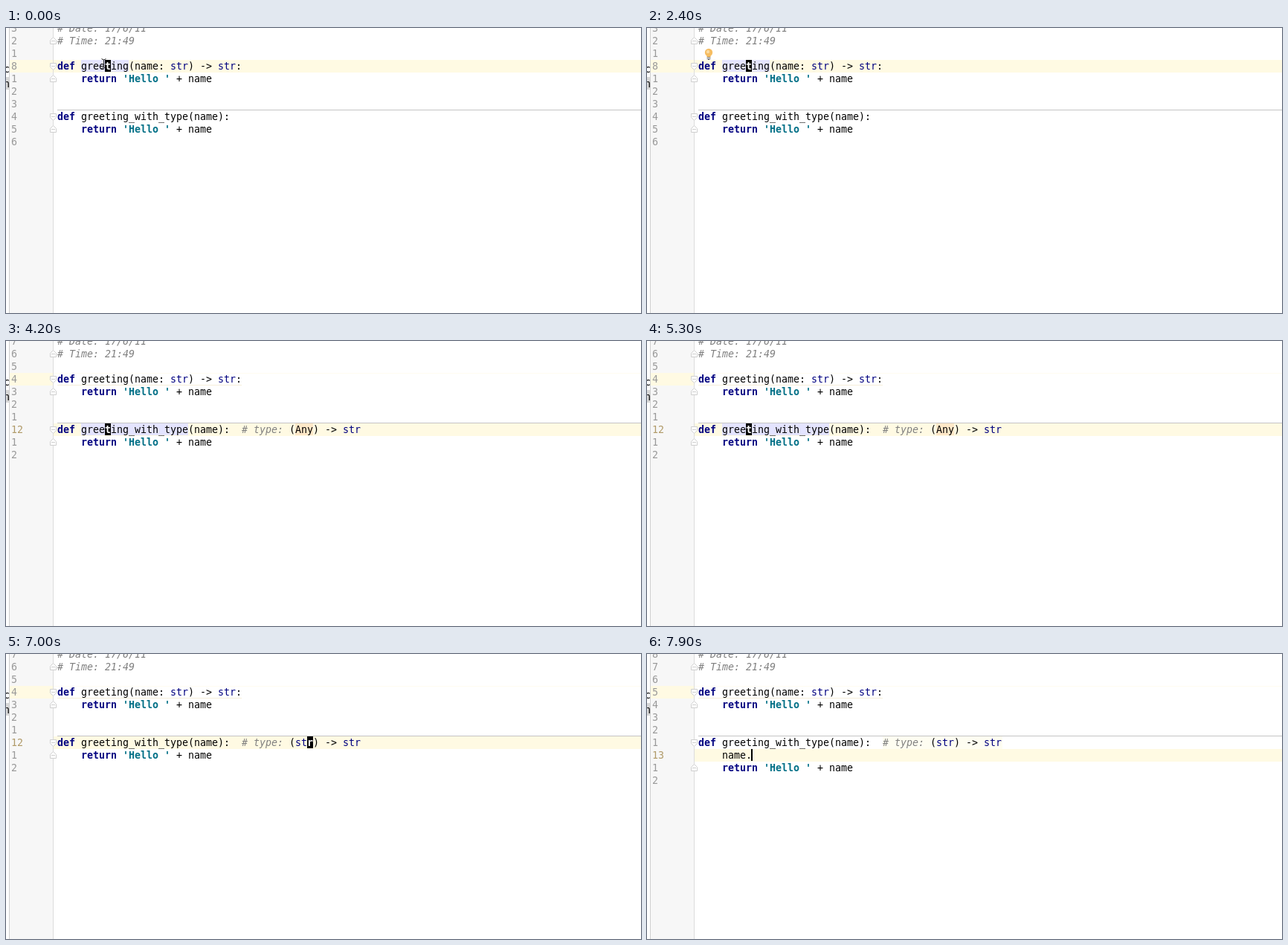
Recreate the animation shown at these times as an HTML page with a canvas. Size 854 px wide and 384 px high, loop 8000 ms.

```html
<!DOCTYPE html>
<html lang="en">
<head>
<meta charset="utf-8">
<title>Editor: type comment</title>
<style>
  html, body { margin: 0; width: 100%; height: 100%; overflow: hidden; background: #fff; }
  canvas { display: block; }
</style>
</head>
<body>
<canvas id="stage" width="854" height="384"></canvas>
<script>
const ctx = document.getElementById('stage').getContext('2d');
const W = 854, H = 384, LOOP = 8000;
const LEFT = 69, CHAR = 8, ROW = 17;
const FAMILY = '"DejaVu Sans Mono", monospace';
const SIZE = '13.29px ';

const STYLES = {
  plain: ['', '#000'],
  keyword: ['bold ', '#000080'],
  string: ['bold ', '#006f86'],
  builtin: ['', '#000080'],
  comment: ['italic ', '#808080'],
  number: ['', '#999'],
  current: ['', '#b09a68'],
  caret: ['bold ', '#fff']
};

// time, row, column, shape
const CARET = [
  [0, 3, 8, 'block'], [600, 3, 8, 'off'], [900, 3, 8, 'block'],
  [1200, 3, 8, 'off'], [1500, 3, 8, 'block'], [1700, 3, 8, 'off'],
  [2200, 3, 8, 'block'], [2500, 4, 8, 'block'], [2600, 5, 0, 'block'],
  [2700, 6, 0, 'block'], [2800, 7, 8, 'block'], [3700, 7, 8, 'off'],
  [4200, 7, 8, 'block'], [4500, 7, 8, 'off'], [4700, 7, 8, 'block'],
  [5000, 7, 8, 'off'], [5200, 7, 8, 'block'], [5400, 7, 40, 'block'],
  [5700, 7, 40, 'off'], [6000, 7, 40, 'block'], [6200, 7, 40, 'off'],
  [6500, 7, 40, 'bar'], [6600, 7, 41, 'bar'], [6700, 7, 42, 'bar'],
  [6800, 7, 43, 'bar'], [7000, 7, 42, 'block'], [7200, 7, 42, 'off'],
  [7500, 8, 4, 'bar']
];

const colX = col => LEFT + col * CHAR;
const rowTop = row => row * ROW - 8;
const between = (t, from, to) => t >= from && t < to;

function rect(x, y, w, h, color) {
  ctx.fillStyle = color;
  ctx.fillRect(x, y, w, h);
}

function text(str, x, row, style) {
  const [weight, color] = STYLES[style];
  ctx.font = weight + SIZE + FAMILY;
  ctx.fillStyle = color;
  ctx.fillText(str, x, row * ROW + 5);
}

function codeLines(t, body) {
  const ret = [['    ', 'plain'], ['return', 'keyword'], [' ', 'plain'],
    ["'Hello '", 'string'], [' + name', 'plain']];
  const typed = [['def', 'keyword'], [' greeting_with_type(name):', 'plain']];
  if (t >= 3200) {
    const arg = t < 6500 ? 'Any' : 'str'.slice(0, Math.floor((t - 6500) / 100));
    typed.push(['  ', 'plain'], ['# type: ', 'comment'], ['(', 'plain'],
      [arg, t < 6500 ? 'plain' : 'builtin'], [') -> ', 'plain'], ['str', 'builtin']);
  }
  const lines = [
    [['# Date: 17/6/11', 'comment']],
    [['# Time: 21:49', 'comment']],
    [],
    [['def', 'keyword'], [' greeting(name: ', 'plain'], ['str', 'builtin'],
      [') -> ', 'plain'], ['str', 'builtin'], [':', 'plain']],
    ret, [], [], typed
  ];
  if (body !== null) lines.push([['    ' + body, 'plain']]);
  lines.push(ret, []);
  return lines;
}

function drawGutter(current, count) {
  rect(0, 0, 64, H, '#f7f7f7');
  rect(0, 0, 4, H, '#fff');
  rect(0, 66, 4, 17, '#d8d8d8');
  ctx.save();
  ctx.beginPath();
  ctx.rect(0, 0, 4, H);
  ctx.clip();
  text('c', -3, 3.25, 'plain');
  text('n', -3, 4.4, 'plain');
  ctx.restore();
  rect(5, rowTop(3), 59, ROW, '#fffae3');
  rect(4, 0, 1, H, '#d0d0d0');
  rect(63, 0, 1, H, '#dcdcdc');
  for (let r = 0; r < count; r++) {
    const label = r === current ? r + 5 : Math.abs(r - current);
    text(label, 7, r, r === current && r !== 3 ? 'current' : 'number');
  }
}

function drawFold(row, dir) {
  const y = row * ROW + 0.5;
  ctx.beginPath();
  ctx.moveTo(59.5, y - 4 * dir);
  ctx.lineTo(67.5, y - 4 * dir);
  ctx.lineTo(67.5, y + dir);
  ctx.lineTo(63.5, y + 5 * dir);
  ctx.lineTo(59.5, y + dir);
  ctx.closePath();
  ctx.fillStyle = '#fff';
  ctx.fill();
  ctx.strokeStyle = '#cfcfcf';
  ctx.lineWidth = 1;
  ctx.stroke();
  rect(61, row * ROW, 5, 1, '#cfcfcf');
}

function drawBulb(row) {
  const y = row * ROW;
  ctx.fillStyle = '#f6bd62';
  ctx.beginPath();
  ctx.arc(83, y - 1, 5.2, 0, 7);
  ctx.fill();
  rect(80.5, y + 2, 5, 3, '#f6bd62');
  ctx.fillStyle = '#fbdca4';
  ctx.beginPath();
  ctx.arc(82, y - 2, 2.2, 0, 7);
  ctx.fill();
  rect(80.5, y + 5, 5, 1, '#777');
  rect(80.5, y + 7, 5, 1, '#777');
  rect(82, y + 8, 2, 1, '#777');
}

function drawMouse(t) {
  const p = Math.min(1, Math.max(0, (t - 600) / 300));
  const x = Math.round(131 + 357 * p), y = Math.round(48 + 17 * p);
  ctx.strokeStyle = '#222';
  ctx.lineWidth = 1;
  ctx.beginPath();
  ctx.moveTo(x - 2.5, y - 6.5);
  ctx.lineTo(x + 0.5, y - 5);
  ctx.lineTo(x + 3.5, y - 6.5);
  ctx.moveTo(x + 0.5, y - 5);
  ctx.lineTo(x + 0.5, y + 5);
  ctx.moveTo(x - 2.5, y + 6.5);
  ctx.lineTo(x + 0.5, y + 5);
  ctx.lineTo(x + 3.5, y + 6.5);
  ctx.stroke();
}

function drawCaret(line, row, col, shape) {
  const x = colX(col), y = rowTop(row);
  if (shape === 'bar') rect(x - 1, y, 2, 16, '#000');
  if (shape === 'block') {
    rect(x, y, CHAR, 16, '#000');
    const str = line.map(part => part[0]).join('');
    text(str[col] || '', x, row, 'caret');
  }
}

function draw(t) {
  const body = t < 7500 ? null : 'name.'.slice(0, Math.floor((t - 7500) / 80));
  let [, row, col, shape] = CARET.filter(key => key[0] <= t).pop();
  if (body) col += body.length;
  const lines = codeLines(t, body);

  rect(0, 0, W, H, '#fff');
  drawGutter(row, lines.length);
  if (row !== 3) {
    rect(64, 43, W - 64, 1, '#fffcf1');
    rect(LEFT, 59, 248, 1, '#f6efda');
  }
  if (body !== null) rect(colX(31), rowTop(7), 161, ROW, '#fefdf1');
  rect(64, rowTop(row), W - 64, ROW, '#fffae3');

  if (t < 2500) rect(colX(4), rowTop(3), 64, 16, '#e4e4ff');
  if (between(t, 2800, 5700)) rect(colX(4), rowTop(7), 144, 16, '#e4e4ff');
  if (between(t, 3200, 6500)) rect(colX(40), rowTop(7), 24, 16, '#ffe8c8');
  rect(LEFT, 110, W - LEFT, 1, '#c4c4c4');

  lines.forEach((line, r) => {
    let c = 0;
    for (const [str, style] of line) {
      text(str, colX(c), r, style);
      c += str.length;
    }
  });

  drawFold(1, -1);
  drawFold(3, 1);
  drawFold(4, -1);
  drawFold(7, 1);
  drawFold(lines.length - 2, -1);

  if (between(t, 1100, 2500)) drawBulb(2);
  if (between(t, 2900, 3200)) drawBulb(6);
  drawCaret(lines[row], row, col, shape);
  if (t < 1700) drawMouse(t);
}

function tick() {
  draw(performance.now() % LOOP);
  requestAnimationFrame(tick);
}
tick();
</script>
</body>
</html>
```
